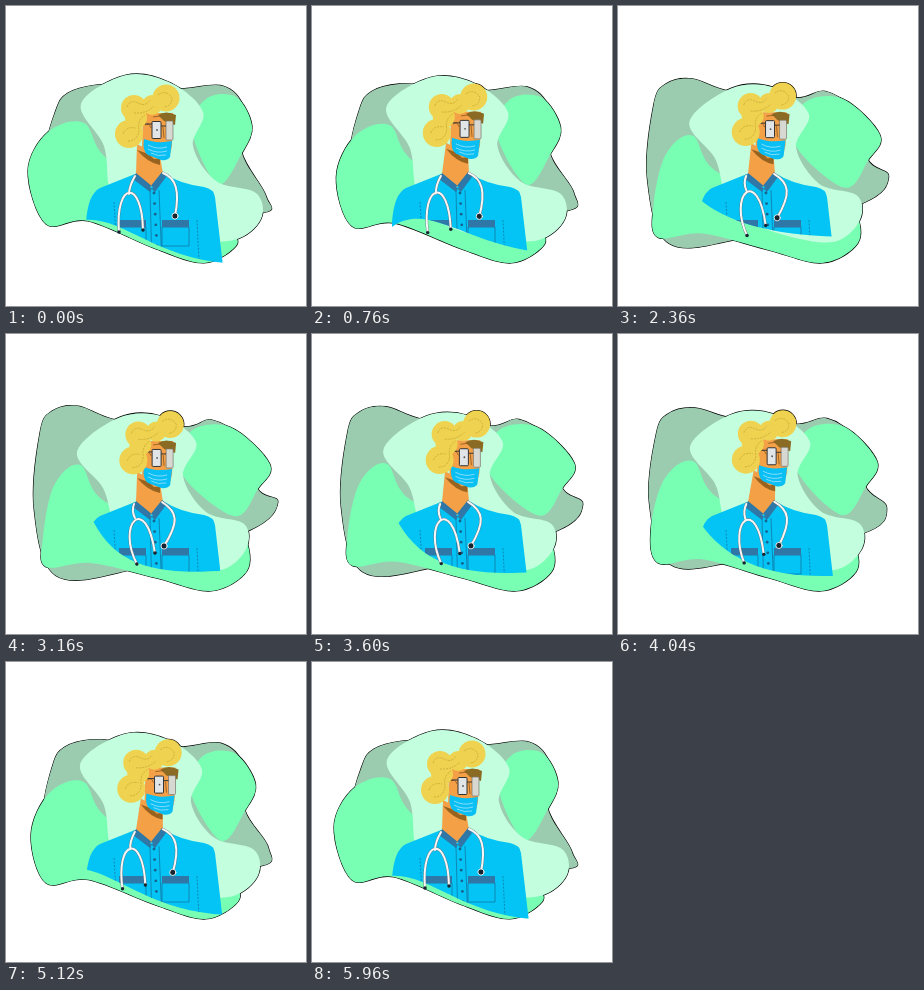
Write an HTML page that moves like this. It is 300x300 px and loops after 6000 ms.

```html
<!DOCTYPE html>
<html lang="en">
<head>
<meta charset="utf-8">
<title>Doctor</title>
<style>
html, body { margin: 0; width: 100%; height: 100%; overflow: hidden; background: #fff; }
svg { display: block; width: 100vw; height: 100vh; }
.thin { fill: none; stroke: #17618f; stroke-width: .6; }
.curl { fill: none; stroke: #b99a2c; stroke-width: .6; stroke-dasharray: 2 1; }
</style>
</head>
<body>
<svg viewBox="0 0 300 300">
  <defs><clipPath id="hem"><path id="hemPath"/></clipPath></defs>
  <g id="outline" fill="#000" stroke="#000" stroke-width="1.2"><g id="hairEdge"></g></g>
  <g id="blobs"></g>

  <path id="neckSkin" fill="#f3a047"/>
  <path id="neckShade" fill="#98621f"/>

  <g clip-path="url(#hem)">
    <path fill="#03c4f4" d="M80 216Q82 188 94 182L129 168L145 181L157 167Q174 178 198 181Q208 183 209 191L217 260H80Z"/>
    <path fill="#2e77a6" d="M130 167L127 173L144 186L147 181ZM156 166L160 171L149 186L144 181Z"/>
    <path fill="#2e77a6" d="M113 214H140V221.5H113ZM156 214H183V221.5H156Z"/>
    <path class="thin" d="M113 221V242H140V221M156 221V240H183V221M144 185L146 260M153 184L156 260"/>
    <path class="thin" stroke-dasharray="2 1.5" d="M191 214L193 255M108 196L110 230"/>
    <g id="buttons" fill="#17618f"></g>
  </g>

  <g id="face">
    <path fill="#f3a047" d="M137 107H167L166 140L163 152L148 153L136 142Z"/>
    <path fill="#8b6b23" d="M152 109Q160 104 170 109L169 119L158 115Z"/>
    <path fill="none" stroke="#8a5720" stroke-width=".8" d="M139 119Q143 116 145 122M147 111L155 110M157 121L158 132"/>
    <rect x="160" y="115" width="7" height="19" rx="1" fill="#d8d8d2" stroke="#77736a" stroke-width=".7"/>
    <rect x="146" y="115.5" width="9" height="17" rx="1" fill="#e2e5e7" stroke="#333"/>
    <path stroke="#333" d="M138 118H146M155 120H160"/>
    <circle cx="151" cy="124" r=".9" fill="#555"/>
    <path fill="#0abff3" d="M138 133Q150 138 166 135L164 151Q161 155 155 154L142 149Q136 145 138 133Z"/>
    <path fill="none" stroke="#a5e4fb" stroke-width=".8" d="M142 139Q151 144 161 141M142 143Q151 148 161 145M145 147Q152 151 160 149"/>
  </g>

  <g id="hair">
    <g id="curls" fill="#efd24f"></g>
    <path class="curl" d="M121 101Q124 93 132 97Q140 101 144 94M152 89Q160 83 166 92Q166 100 158 101M117 128Q120 120 130 122M122 135Q132 135 133 124Q131 114 139 109M128 107Q140 108 148 100"/>
  </g>

  <g fill="none" stroke-linecap="round">
    <path class="tube" stroke="#657078" stroke-width="2.7"/>
    <path class="tube" stroke="#f7f7f7" stroke-width="2"/>
    <circle id="tipLeft" r="1.7" fill="#162530"/>
    <circle id="tipRight" r="1.7" fill="#162530"/>
    <circle id="chest" r="3.1" fill="#162530" stroke="#f7f7f7" stroke-width=".9"/>
  </g>
</svg>
<script>
const LOOP = 6000;
const $ = id => document.getElementById(id);
const nums = text => text.match(/[\d.]+/g).map(Number);
const pairs = list => Array.from({ length: list.length / 2 }, (_, i) => list.slice(2 * i, 2 * i + 2));
const fixed = list => list.map(v => v.toFixed(2)).join(' ');
const setPath = (node, d) => node.setAttribute('d', d);
const move = (node, x, y) => node.setAttribute('transform', `translate(${fixed([x, y])})`);

function add(parent, tag, attrs = {}) {
  const node = document.createElementNS('http://www.w3.org/2000/svg', tag);
  for (const key in attrs) node.setAttribute(key, attrs[key]);
  return parent.appendChild(node);
}

// Returns a function that blends two lists of key points
function blend(from, to) {
  const a = nums(from), b = nums(to);
  return k => a.map((v, i) => v + (b[i] - v) * k);
}

// Closed Catmull-Rom spline
function blobPath(list) {
  const points = pairs(list), n = points.length;
  return 'M' + fixed(points[0]) + points.map((p, i) => {
    const before = points[(i + n - 1) % n], q = points[(i + 1) % n], after = points[(i + 2) % n];
    const handle = (at, a, b) => at.map((v, j) => v + (b[j] - a[j]) / 6);
    return 'C' + fixed([...handle(p, before, q), ...handle(q, after, p), ...q]);
  }).join('') + 'Z';
}

const cubic = list => fixed(list.slice(0, 2)) + 'C' + fixed(list.slice(2));

function makeBlob(color, from, to) {
  const edge = add($('outline'), 'path');
  const fill = add($('blobs'), 'path', { fill: color });
  const shape = blend(from, to);
  return k => [edge, fill].forEach(node => setPath(node, blobPath(shape(k))));
}

const blobs = [
  makeBlob('#9bccb0',
    '50,104 62,87 90,79 125,79 172,83 217,80 238,103 236,147 260,190 252,207 120,200 60,200 40,150',
    '34,98 46,77 72,72 110,86 179,93 206,86 236,106 252,155 272,168 244,196 125,236 50,242 28,175'),
  makeBlob('#78ffb4',
    '22,165 42,126 78,117 104,155 200,205 225,225 230,240 198,257 150,243 82,215 40,218',
    '37,205 48,152 74,131 104,170 222,192 240,205 241,237 205,257 150,244 85,229 40,233'),
  makeBlob('#78ffb4',
    '186,125 200,93 230,91 246,120 236,147 212,178',
    '176,140 184,98 224,93 264,130 252,155 228,182'),
  makeBlob('#c3ffde',
    '75,98 120,69 165,77 197,106 187,140 210,175 250,187 255,213 228,234 175,232 125,215 104,185 98,140',
    '71,118 112,84 155,82 190,108 177,142 200,178 238,190 240,215 215,236 170,230 125,212 107,186 97,154')
];

// Stethoscope: stem, ear loop and chest tube
const stem = blend('129,170 125,177 123,182 123,188', '128,170 126,175 127,180 129,184');
const loop = blend('113,226 109,176 136,172 137,224', '131,230 110,190 140,158 149,219');
const tube = blend('157,167 170,172 174,185 169,210', '156,168 172,178 173,188 158,212');

const hemLine = blend('78,214 115,210 150,252 220,257', '84,180 106,232 150,242 220,236');

for (const [cx, cy, r] of [[123, 128, 14], [130, 112, 11], [128, 102, 13], [146, 99, 10], [160, 92, 13.5]]) {
  for (const id of ['curls', 'hairEdge']) add($(id), 'circle', { cx, cy, r });
}
for (let i = 0; i < 6; i++) add($('buttons'), 'circle', { cx: 148 + i * .6, cy: 187 + i * 10.6, r: 1.4 });

function drawHead(morph, nod) {
  const dx = 4 * nod, dy = -2.2 * nod, back = 131 + 1.5 * dx;
  move($('face'), dx, dy);
  setPath($('neckSkin'), `M${back} ${138 + dy}L${154 + dx} ${150 + dy}L157 168L145 182L130 168Z`);
  setPath($('neckShade'), `M${back} ${144 + dy}L${154 + dx} ${152 + dy}V${159 + dy}Q${142 + dx} ${157 + dy} ${back} ${144 + dy}Z`);
  for (const id of ['hair', 'hairEdge']) move($(id), 4.3 * morph + 2.2 * nod, -1.5 * (morph + nod));
}

function drawHem(morph, swing) {
  const line = hemLine(morph), lift = Math.max(0, swing);
  [18, -25, -22, -12].forEach((rise, i) => line[2 * i + 1] += rise * lift);
  setPath($('hemPath'), `M${line[0]} 100L${cubic(line)}V100Z`);
}

function drawScope(morph) {
  const lines = [stem, loop, tube].map(part => part(morph));
  const d = lines.map(line => 'M' + cubic(line)).join('');
  document.querySelectorAll('.tube').forEach(node => setPath(node, d));
  move($('tipLeft'), ...lines[1].slice(0, 2));
  move($('tipRight'), ...lines[1].slice(-2));
  move($('chest'), ...lines[2].slice(-2));
}

function draw(time) {
  const angle = 2 * Math.PI * time / LOOP;
  const swing = Math.sin(angle);
  const morph = (1 - Math.cos(angle)) / 2;
  blobs.forEach(drawBlob => drawBlob(morph));
  drawHead(morph, swing ** 2);
  drawHem(morph, swing);
  drawScope(morph);
}

const start = performance.now();
function tick() {
  draw((performance.now() - start) % LOOP);
  requestAnimationFrame(tick);
}
tick();
</script>
</body>
</html>
```
